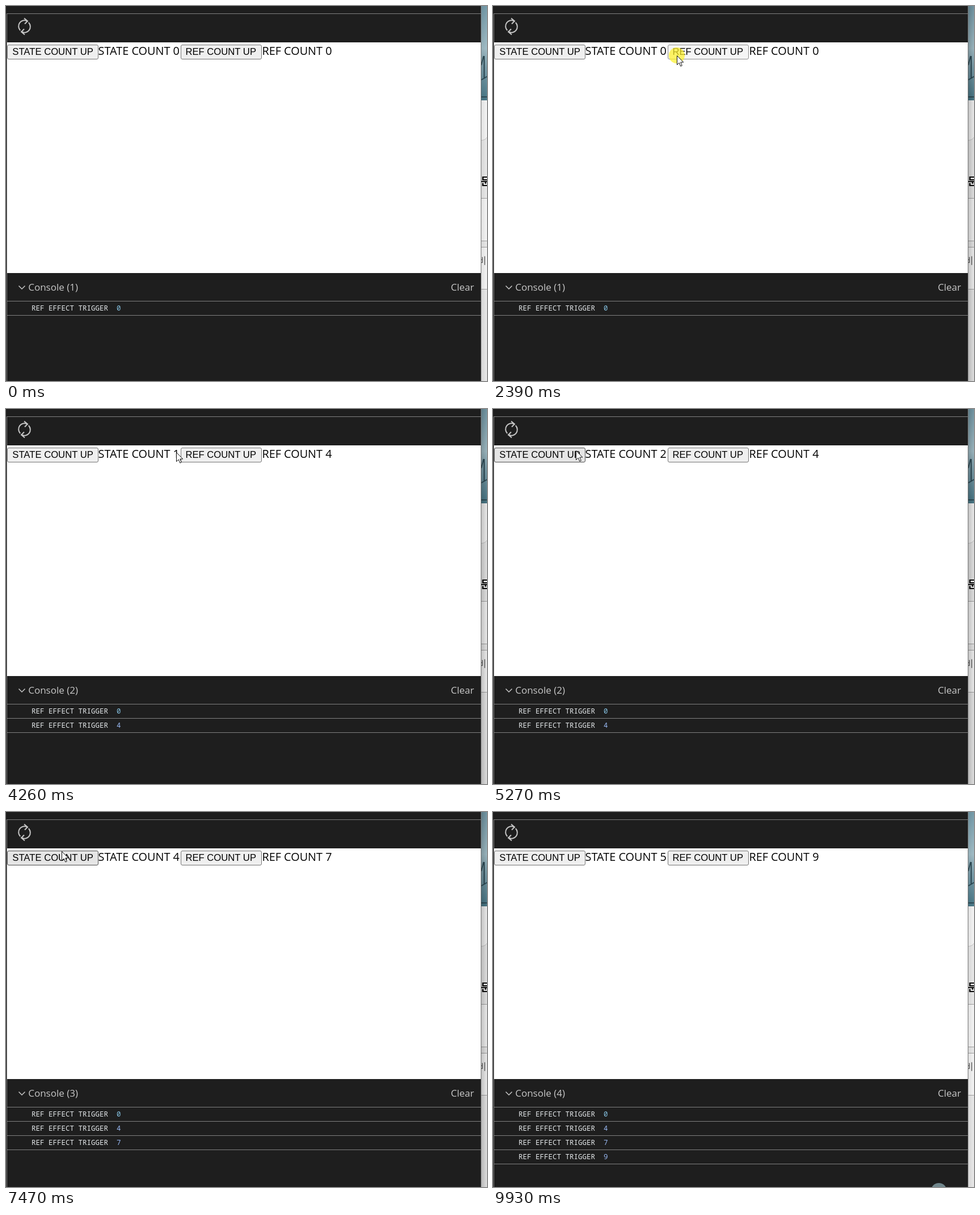
Animation, 848 px wide and 660 px high, one loop 9990 ms. Source, as an HTML page:

```html
<!DOCTYPE html>
<html lang="en">
<head>
<meta charset="utf-8">
<title>State and ref counters</title>
<style>
  html, body { margin: 0; width: 100%; height: 100%; overflow: hidden; background: #1e1e1e; }
  svg { display: block; width: 848px; height: 660px; }
  text { white-space: pre; }
  .line { fill: #808080; }
  .button rect { fill: #efefef; stroke: #767676; }
  .button.hover rect { fill: #e5e5e5; stroke: #4f4f4f; }
  .button.active rect { fill: #f5f5f5; stroke: #8d8d8d; }
  .button text { font: 16.667px "Liberation Sans", Arial, sans-serif; }
  .label { font: 19.85px "Open Sans", sans-serif; }
  .bar { font: 17px "Open Sans", sans-serif; fill: #c8c8c8; }
  .log { font: 12.5px "Noto Sans Mono", monospace; fill: #e4e8ea; }
  .log tspan { fill: #98b8f2; }
  .log .first { fill: #86c2e2; }
  .icon { fill: none; stroke: #c5c5c5; }
  .korean { font-family: "Noto Sans CJK KR", "Noto Sans CJK", sans-serif; }
</style>
</head>
<body>
<svg viewBox="0 0 848 660">
  <defs>
    <linearGradient id="photo" x2="0" y2="1">
      <stop offset="0" stop-color="#7ba3b2"/>
      <stop offset=".45" stop-color="#a9c6d0"/>
      <stop offset=".65" stop-color="#7fa3b0"/>
      <stop offset="1" stop-color="#4c7e8e"/>
    </linearGradient>
    <linearGradient id="shade">
      <stop offset="0" stop-opacity=".24"/>
      <stop offset="1" stop-opacity=".09"/>
    </linearGradient>
    <path id="arc" d="M25.2 43A10.4 10.4 0 0 1 37.5 26.5M32 21.5L38 26.5L33 31.5"/>
  </defs>

  <rect width="848" height="660" fill="#1e1e1e"/>

  <!-- page behind the window -->
  <g>
    <rect x="838" width="10" height="660" fill="#f3f3f3"/>
    <rect x="838" width="10" height="166" fill="url(#photo)"/>
    <path d="M838 104L842 88M838 130L848 124M843 88V128M838 160H848" fill="none" stroke="#31505b" stroke-width="2"/>
    <path d="M838 166H848V231Q845 236 838 236Z" fill="#fff"/>
    <path d="M838 236.5Q845 236 848 231" fill="none" stroke="#cfcfcf"/>
    <rect x="838" y="338" width="10" height="76" fill="#fff"/>
    <rect x="838" y="424" width="10" height="75" fill="#fff"/>
    <path d="M838 338.5H848M838 413.5H848M838 424.5H848M838 498.5H848" stroke="#a8a8a8"/>
    <text class="korean" x="837" y="315" font-size="18" font-weight="700">문</text>
    <text class="korean" x="832" y="454" font-size="16" fill="#555">비</text>
    <rect id="shadow" x="838" width="10" height="660" fill="url(#shade)"/>
  </g>

  <!-- preview window -->
  <rect width="837" height="660" fill="#1e1e1e"/>
  <rect class="line" x="1" y="13" width="836" height="1"/>
  <rect class="line" x="1" y="13" width="1" height="647"/>
  <rect x="837" width="1" height="660" fill="#757575"/>
  <g class="icon" stroke-width="2">
    <use href="#arc"/>
    <use href="#arc" transform="rotate(180 32.5 36)"/>
  </g>
  <rect x="2" y="64" width="835" height="406" fill="#fff"/>

  <g class="button" id="stateButton">
    <rect x="2.5" y="68.5" width="160" height="25" rx="2.5"/>
    <text x="11.3" y="86">STATE COUNT UP</text>
  </g>
  <text class="label" id="stateLabel" x="162.6" y="86"></text>
  <g class="button" id="refButton">
    <rect x="308.5" y="68.5" width="142" height="25" rx="2.5"/>
    <text x="316.4" y="86">REF COUNT UP</text>
  </g>
  <text class="label" id="refLabel" x="451.4" y="86"></text>

  <path class="icon" d="M22.5 492.5L28 498L33.5 492.5" stroke-width="1.5"/>
  <text class="bar" id="title" x="39.2" y="501"></text>
  <text class="bar" x="784.2" y="501">Clear</text>
  <rect class="line" x="2" y="519" width="835" height="1"/>
  <g id="logs"></g>

  <circle id="mark" cx="786" cy="667" r="14" fill="#70868c"/>
  <g id="pointer">
    <circle id="halo" r="14" fill="#fff12d" fill-opacity=".72"/>
    <path d="M.5 .5V16.5L4.2 13L6.8 19L9.3 17.9L6.8 12H11.8Z" fill="#fff" stroke="#111"/>
  </g>
</svg>

<script>
  const LOOP = 9990, STEP = 66.5;
  const START = [727, 660];
  // start time, steps, target x, target y
  const moves = [
    [250, 12, 105, 84], [1520, 6, 324, 87], [3060, 6, 113, 73],
    [4130, 4, 335, 77], [4600, 4, 146, 73], [5800, 5, 325, 81],
    [6670, 4, 97, 68], [7470, 1, 98, 69], [7530, 3, 330, 76],
    [8130, 3, 115, 74], [8800, 1, 123, 80], [8860, 12, 768, 664]
  ];
  // press and release times
  const refClicks = [
    [2390, 2520], [2590, 2660], [2720, 2790], [2860, 2920],
    [6200, 6270], [6340, 6400], [6540, 6600],
    [7860, 7930], [8000, 8060]
  ];
  const stateClicks = [[3460, 3590], [5140, 5270], [5670, 5740], [7000, 7130], [8470, 8530]];

  const $ = id => document.getElementById(id);
  const ease = p => p * p * (3 - 2 * p);
  const released = (clicks, t) => clicks.filter(c => c[1] <= t).length;
  const pressed = (clicks, t) => clicks.some(c => c[0] <= t && t < c[1]);
  const show = (el, on) => el.setAttribute('visibility', on ? 'visible' : 'hidden');

  // The effect logs only when a render finds a new ref value.
  const logs = [{ time: 0, value: 0 }];
  for (const [, time] of stateClicks) {
    const value = released(refClicks, time);
    if (value !== logs[logs.length - 1].value) logs.push({ time, value });
  }
  $('logs').innerHTML = logs.map(({ value }, i) => {
    const y = 519 + 25 * i;
    return `<g><text class="log" x="45" y="${y + 17}">REF EFFECT TRIGGER  <tspan${i ? '' : ' class="first"'}>${value}</tspan></text>` +
      `<rect class="line" x="2" y="${y + 25}" width="835" height="1"/></g>`;
  }).join('');
  const rows = [...$('logs').children];

  function pointerAt(t) {
    let [x, y] = START;
    for (const [start, steps, tx, ty] of moves) {
      if (t < start) break;
      const p = ease(Math.min(1, (Math.floor((t - start + 3) / STEP) + 1) / steps));
      x += (tx - x) * p;
      y += (ty - y) * p;
    }
    return [Math.round(x), Math.round(y)];
  }

  function styleButton(el, hover, active) {
    el.setAttribute('class', 'button' + (active ? ' active' : hover ? ' hover' : ''));
  }

  function render(t) {
    const [x, y] = pointerAt(t);
    const inRow = y >= 68 && y < 94;
    const onState = pressed(stateClicks, t), onRef = pressed(refClicks, t);
    const shown = logs.filter(l => l.time <= t);

    $('pointer').setAttribute('transform', `translate(${x} ${y})`);
    show($('pointer'), t >= 250 && t < 9590);
    show($('halo'), onState || onRef);
    styleButton($('stateButton'), inRow && x >= 2 && x < 163, onState);
    styleButton($('refButton'), inRow && x >= 308 && x < 451, onRef);

    $('stateLabel').textContent = 'STATE COUNT ' + released(stateClicks, t);
    $('refLabel').textContent = 'REF COUNT ' + shown[shown.length - 1].value;
    $('title').textContent = `Console (${shown.length})`;
    rows.forEach((row, i) => show(row, i < shown.length));

    $('shadow').setAttribute('opacity', t >= 2390 && t < 9930 ? 1 : 0.5);
    show($('mark'), t >= 9930);
  }

  const begin = performance.now();
  function tick() {
    render((performance.now() - begin) % LOOP);
    requestAnimationFrame(tick);
  }
  tick();
</script>
</body>
</html>
```
